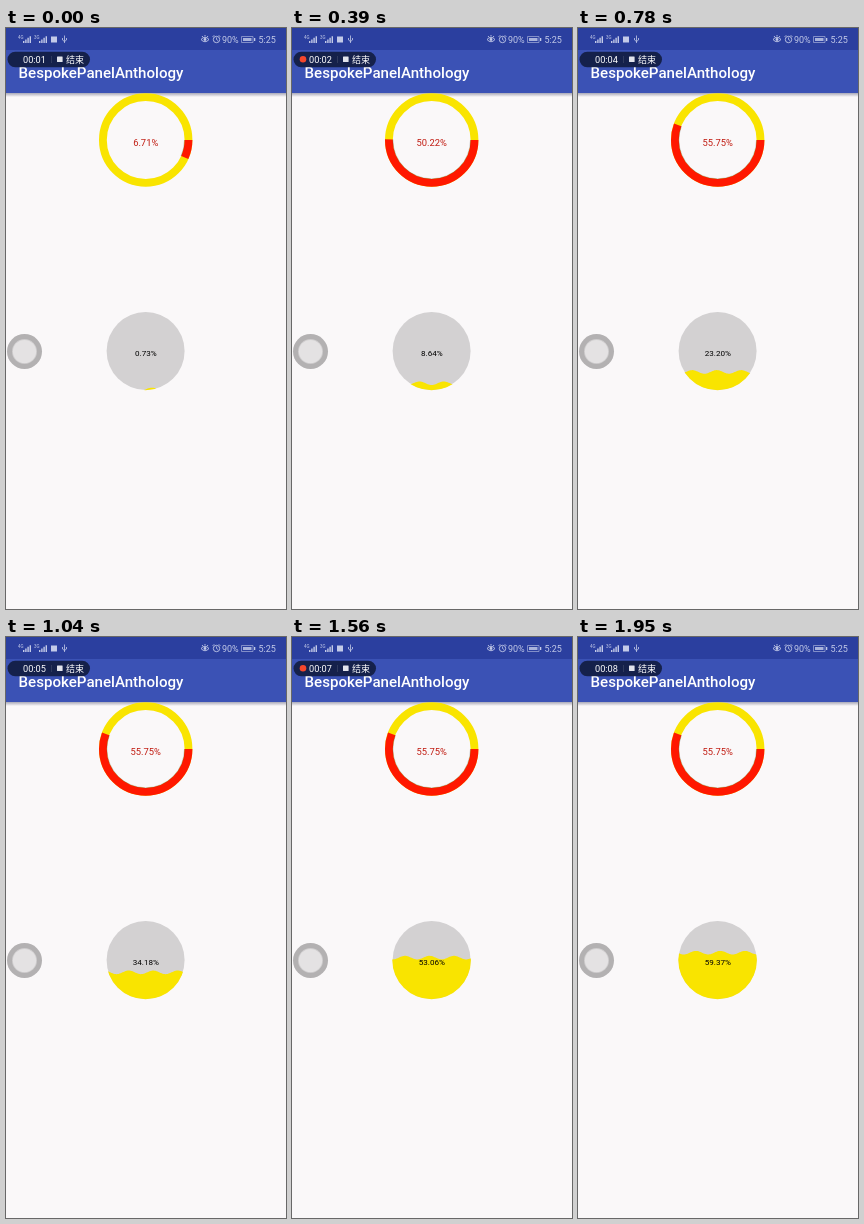
An HTML page with a canvas that plays this animation: 280 px wide and 581 px high, repeating every 2.08 s.

```html
<!DOCTYPE html>
<html lang="en">
<head>
<meta charset="utf-8">
<style>
html, body { margin: 0; width: 100%; height: 100%; overflow: hidden; background: #faf8f9; }
canvas { display: block; }
</style>
</head>
<body>
<canvas id="stage" width="280" height="581"></canvas>
<script>
const ctx = document.getElementById('stage').getContext('2d');
const LOOP = 2080, STEP = 130, STEP_SECONDS = 0.4745;
const YELLOW = '#f9e400', PALE = '#c3cae8';

// Known [step, percent] pairs; values between them ease along a cosine.
const RING = [[0, 6.71], [3, 50.22]];
const LIQUID = [[0, .73], [3, 8.64], [6, 23.2], [8, 34.18], [10, 44.58], [12, 53.06], [15, 59.37]];

function easedValue(keys, end, step) {
  let i = 0;
  while (i < keys.length - 2 && step > keys[i + 1][0]) i++;
  const phase = k => Math.acos(1 - 2 * k[1] / end);
  const [a, b] = [keys[i], keys[i + 1]];
  const p = phase(a) + (phase(b) - phase(a)) * (step - a[0]) / (b[0] - a[0]);
  return end * (1 - Math.cos(Math.min(Math.PI, p))) / 2;
}

function rect(x, y, w, h, color, radius = 0) {
  ctx.fillStyle = color;
  ctx.beginPath();
  ctx.roundRect(x, y, w, h, radius);
  ctx.fill();
}

function disc(x, y, r, color) {
  ctx.fillStyle = color;
  ctx.beginPath();
  ctx.arc(x, y, r, 0, 2 * Math.PI);
  ctx.fill();
}

function arc(x, y, r, width, color, from = 0, to = 2 * Math.PI) {
  ctx.strokeStyle = color;
  ctx.lineWidth = width;
  ctx.beginPath();
  ctx.arc(x, y, r, from, to);
  ctx.stroke();
}

function line(path, color, width = 1) {
  ctx.strokeStyle = color;
  ctx.lineWidth = width;
  ctx.stroke(new Path2D(path));
}

function text(str, x, y, size, color, align = 'left', weight = 400) {
  ctx.font = `${weight} ${size}px Roboto, "Noto Sans CJK SC", "Noto Sans CJK", sans-serif`;
  ctx.textAlign = align;
  ctx.fillStyle = color;
  ctx.fillText(str, x, y);
}

function signal(x, label) {
  text(label, x, 10.5, 4.5, PALE);
  for (let i = 0; i < 4; i++) rect(x + 5 + i * 2.2, 13 - i * 1.6, 1.4, 2 + i * 1.6, PALE);
}

function drawStatusBar() {
  rect(0, 0, 280, 22, '#2b3f9f');
  signal(12, '4G');
  signal(28, '3G');
  rect(45, 8.5, 6, 6, PALE);
  line('M58.5 7.5V15M56.5 10v2l2 1.5l2-1.5v-2', PALE, .8);
  line('M195 11.5q4-4.5 8 0q-4 4.5-8 0M196 8l1 1.2M199 7v1.4M202 8l-1 1.2', PALE, .9);
  disc(199, 11.5, 1.4, PALE);
  arc(210.5, 11.5, 3.2, .9, PALE);
  line('M210.5 9.5v2l1.5 1M206.5 9l1.8-1.8M214.5 9l-1.8-1.8', PALE, .8);
  text('90%', 216, 14.5, 9, PALE);
  line('M235.5 8.5h11.5v6h-11.5z', '#98a3d4', .8);
  rect(237, 10, 8.5, 3, '#a9b3dc');
  rect(248, 10, 1.3, 3, PALE);
  text('5:25', 252.5, 14.5, 9, PALE);
}

function drawToolbar() {
  const shadow = ctx.createLinearGradient(0, 65, 0, 69);
  shadow.addColorStop(0, '#a9a9b8');
  shadow.addColorStop(1, '#faf8f9');
  rect(0, 65, 280, 4, shadow);
  rect(0, 22, 280, 43, '#3b52b5');
  text('BespokePanelAnthology', 12.5, 50, 15.1, '#fff', 'left', 500);
}

function drawRecorder(seconds) {
  rect(1.5, 23.7, 82.5, 15.6, '#15214b', 7.8);
  const blink = seconds % 1;
  if (blink > .21 && blink < .72) disc(11, 31.3, 3.3, '#f4472c');
  text('00:0' + Math.floor(1.31 + seconds), 17, 35, 9.2, '#fff');
  rect(45, 28, .7, 7, '#3b4568');
  rect(51, 28.5, 5.6, 5.6, '#e2e4ec', .5);
  text('结束', 60, 35.2, 9, '#fff');
}

function drawRing(percent) {
  const x = 139.7, y = 112, end = percent / 50 * Math.PI;
  arc(x, y, 42.8, 7.8, YELLOW);
  arc(x, y, 42.8, 7.8, '#ff1800', 0, end);
  arc(x, y, 38.8, .5, 'rgba(60,70,60,.5)', 0, end);
  text(percent.toFixed(2) + '%', x, 117.5, 9.4, '#c01a10', 'center');
}

function drawLiquid(percent) {
  const x = 139.6, y = 323, r = 39, wave = 24.5;
  const level = y + r - percent / 100 * 2 * r;
  const crest = x - r - (1 - percent / 100) * 2 * r;
  disc(x, y, r, '#d3d1d2');
  ctx.save();
  ctx.beginPath();
  ctx.arc(x, y, r + .3, 0, 2 * Math.PI);
  ctx.clip();
  ctx.beginPath();
  ctx.moveTo(x - r - 1, y + r + 1);
  for (let px = x - r - 1; px <= x + r + 1; px++) {
    ctx.lineTo(px, level - 1.8 * Math.cos((px - crest) / wave * 2 * Math.PI));
  }
  ctx.lineTo(x + r + 1, y + r + 1);
  ctx.fillStyle = YELLOW;
  ctx.fill();
  ctx.restore();
  text(percent.toFixed(2) + '%', x + .2, 327.7, 8.1, '#000', 'center');
}

function drawTouchButton() {
  disc(18.5, 323.5, 17.5, '#b3b1b2');
  disc(18.5, 323.5, 12.5, '#cfcdce');
  disc(18.5, 323.5, 11.6, '#e4e2e3');
}

function draw(now) {
  const step = Math.floor(now % LOOP / STEP);
  rect(0, 0, 280, 581, '#faf8f9');
  drawStatusBar();
  drawToolbar();
  drawRecorder(step * STEP_SECONDS);
  drawRing(easedValue(RING, 55.75, step));
  drawLiquid(easedValue(LIQUID, 59.6, step));
  drawTouchButton();
}

const origin = performance.now();
function tick() {
  draw(performance.now() - origin);
  requestAnimationFrame(tick);
}
tick();
</script>
</body>
</html>
```
